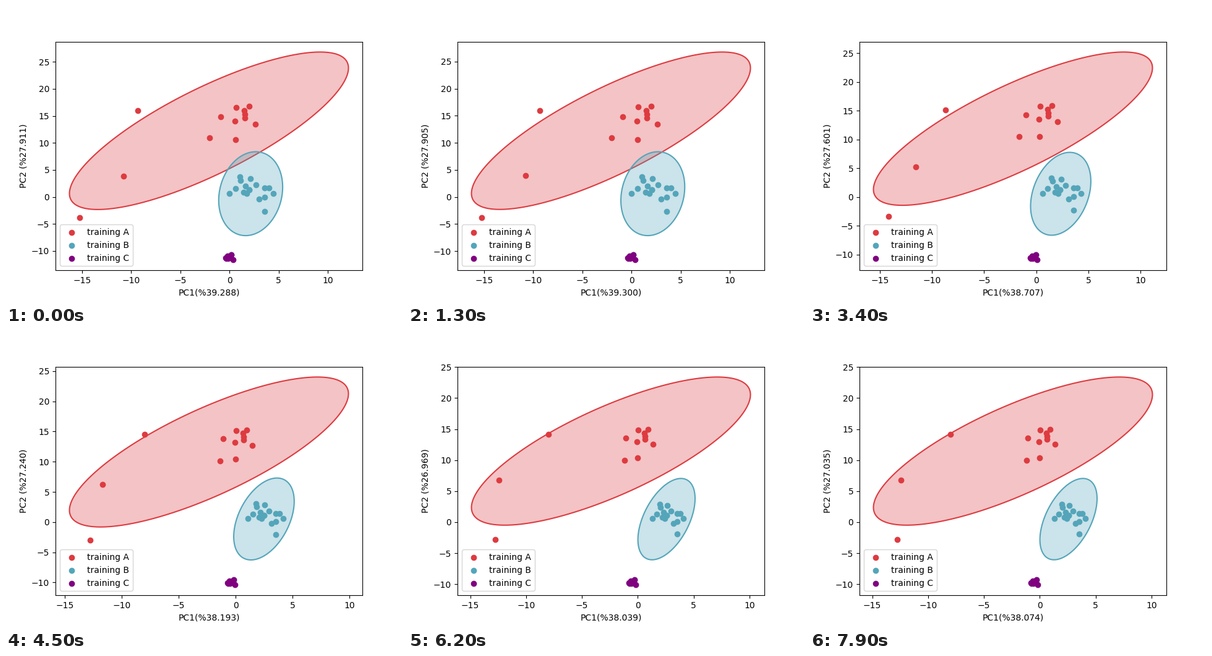
These frames come from a looping animation (640x480 px, 8 s). A matplotlib script:

```python
import numpy as np
import matplotlib.pyplot as plt
from matplotlib.animation import FuncAnimation
from matplotlib.colors import to_rgba
from matplotlib.patches import Polygon

RED, BLUE, PURPLE = "#dd3b40", "#54a5ba", "purple"
FRAMES, STEP = 80, 100
MOVE_START, MOVE_END = 800, 5700
CHI95 = 2.4477  # 95 % radius of a 2-D normal distribution

# Settled samples; each cluster starts out wider and around another centre.
A_CORE = np.array([(0.04, 14.85), (0.6, 14.4), (0.93, 14.95), (-1.06, 13.55), (0.65, 13.85),
                   (0.65, 13.35), (1.37, 12.55), (-0.07, 12.95), (0, 10.36)])
B_CORE = np.array([(1.32, 0.59), (1.98, 2.88), (1.71, 1.29), (2.21, 0.79),
                   (2.04, 2.38), (2.43, 0.59), (2.65, 2.68), (2.98, 1.78),
                   (2.32, 1.59), (2.59, 1.09), (3.54, 1.39), (3.54, 0.09),
                   (3.2, -0.21), (3.81, 1.39), (4.09, 0.59), (3.54, -1.9)])
C_CORE = np.array([(-0.29, -9.28), (-0.79, -9.78), (-0.62, -9.53), (-0.73, -9.93),
                   (-0.57, -9.88), (-0.4, -9.58), (-0.18, -10.12)])

# Outliers of A travel on their own.
A_FAR_START = np.array([(-9.33, 15.94), (-2.02, 11.0), (-10.78, 3.9), (-15.26, -3.8)])
A_FAR_END = np.array([(-7.99, 14.15), (-1.18, 9.96), (-12.43, 6.77), (-12.76, -2.8)])

PC_MS = [0, 1300, 2300, 4500, 5700, 6900, 7900]
PC1 = [39.288, 39.300, 39.222, 38.193, 38.024, 38.060, 38.074]
PC2 = [27.911, 27.905, 27.962, 27.240, 26.956, 26.987, 27.035]


def progress(ms):
    u = np.clip((ms - MOVE_START) / (MOVE_END - MOVE_START), 0, 1)
    return (u * u * (3 - 2 * u)) ** 1.3


def gather(core, centre, spread, s):
    """Move a cluster from a scaled copy around centre to its settled place."""
    start = centre + (core - core.mean(axis=0)) * spread
    return start + (core - start) * s


def groups_at(ms):
    s = progress(ms)
    a = np.vstack([gather(A_CORE, (1.14, 14.69), (1.45, 1.35), s),
                   A_FAR_START + (A_FAR_END - A_FAR_START) * s])
    b = gather(B_CORE, (2.29, 1.27), (1.62, 1.33), s)
    c = gather(C_CORE, (-0.06, -11.18), (1.2, 1.2), s)
    b = np.vstack([b, b[9], c[0]])  # two B samples lie hidden under others

    # A narrows for a moment before it settles.
    squeeze = 0.07 * np.sin(np.pi * np.clip((ms - 4200) / 1500, 0, 1))
    a[:, 0] -= (a[:, 0] - a[:, 0].mean()) * squeeze
    return a, b, c


def confidence_ellipse(pts):
    t = np.linspace(0, 2 * np.pi, 400, endpoint=False)
    root = np.linalg.cholesky(np.cov(pts.T))
    return pts.mean(axis=0) + CHI95 * np.column_stack([np.cos(t), np.sin(t)]) @ root.T


def padded(v, margin=0.05):
    pad = margin * (v.max() - v.min())
    return v.min() - pad, v.max() + pad


fig, ax = plt.subplots(figsize=(6.4, 4.8), dpi=100)


def draw(frame):
    ms = frame * STEP
    a, b, c = groups_at(ms)
    ax.cla()
    extent = [a, b, c]
    for pts, color in ((a, RED), (b, BLUE)):
        outline = confidence_ellipse(pts)
        extent.append(outline)
        ax.add_patch(Polygon(outline, closed=True, fc=to_rgba(color, 0.3),
                             ec=color, lw=1.5))
    for pts, color, name in zip((a, b, c), (RED, BLUE, PURPLE), "ABC"):
        ax.scatter(*pts.T, color=color, label=f"training {name}")
    every = np.vstack(extent)
    ax.set_xlim(padded(every[:, 0]))
    ax.set_ylim(padded(every[:, 1]))
    ax.set_xlabel(f"PC1(%{np.interp(ms, PC_MS, PC1):.3f})")
    ax.set_ylabel(f"PC2 (%{np.interp(ms, PC_MS, PC2):.3f})")
    ax.legend(loc="lower left")
    return []


anim = FuncAnimation(fig, draw, frames=FRAMES, interval=STEP,
                     init_func=lambda: draw(0), repeat=True, repeat_delay=0)
plt.show()
```
